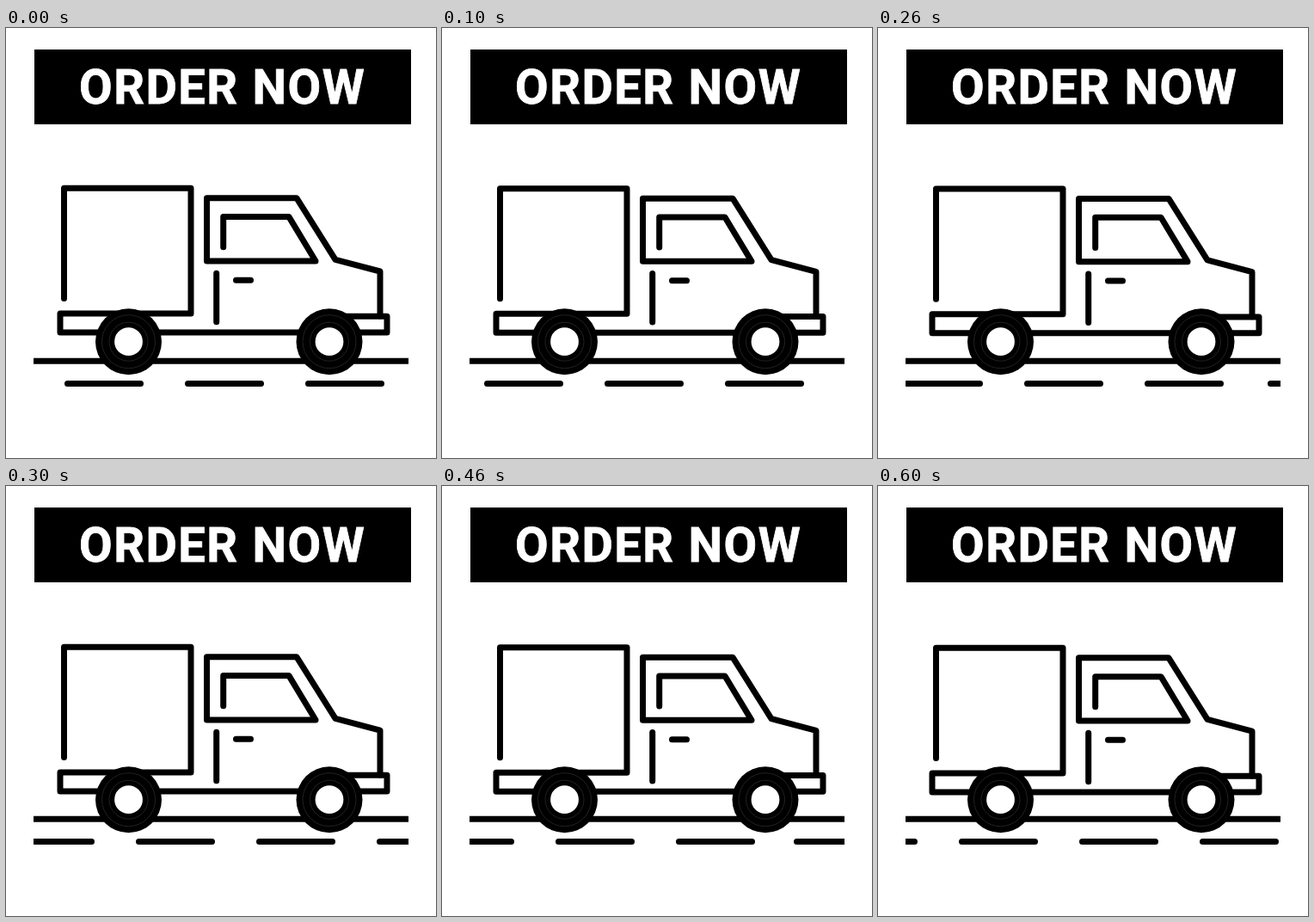
An HTML page that plays this animation: 500x500 px, repeating every 0.7 s.

```html
<!DOCTYPE html>
<html lang="en">
<head>
<meta charset="utf-8">
<title>Order now</title>
<style>
  html, body { margin: 0; width: 100%; height: 100%; overflow: hidden; background: #fff; }
  svg { display: block; width: 100vw; height: 100vh; }
  .line { fill: none; stroke: #000; stroke-width: 7; stroke-linecap: round; stroke-linejoin: round; }
  .ring { fill: none; stroke: #222; stroke-width: 1; }
  text {
    font: bold 56px Roboto, Arial, sans-serif;
    letter-spacing: 1.5px;
    word-spacing: 0.5px;
    fill: #fff;
    stroke: #fff;
    stroke-width: 0.8px;
  }
</style>
</head>
<body>
<svg viewBox="0 0 500 500">
  <defs>
    <clipPath id="lane"><rect x="32" y="400" width="436" height="30"/></clipPath>
    <g id="wheel">
      <circle r="38.5"/>
      <circle r="31" class="ring"/>
      <circle r="22.5" class="ring"/>
      <circle r="16.4" fill="#fff"/>
    </g>
  </defs>

  <rect x="33" y="25" width="438" height="87"/>
  <text x="85" y="88">ORDER NOW</text>

  <path d="M32 387.3H468" stroke="#000" stroke-width="7"/>
  <g clip-path="url(#lane)"><path id="dashes" class="line"/></g>

  <g id="body" class="line">
    <path d="M67.5 314.5V186.3H215V332H63V354H443V335.2H395"/>
    <path d="M435 335V283L383 269.3L338 197.8H233.5V271H360L329 219.6H252.7V254.7"/>
    <path d="M244.7 285.2V341.7M267.5 293.3H284.5"/>
  </g>

  <use href="#wheel" x="142.5" y="364.7"/>
  <use href="#wheel" x="376" y="364.7"/>
</svg>
<script>
  const LOOP = 700, STEP = 100, GAP = 140, DASH = 85;
  const body = document.getElementById('body');
  const dashes = document.getElementById('dashes');
  const start = performance.now();

  function draw() {
    const step = Math.floor(((performance.now() - start) % LOOP) / STEP);
    const first = 71.5 - 19 * step;
    const starts = [0, 1, 2].map(i => first + GAP * i);
    // The dash entering on the right runs faster, then falls into line.
    starts.push(step < 6 ? 500.5 - 22 * step : first + GAP * 3);
    dashes.setAttribute('d', starts.map(x => `M${x} 413.5h${DASH}`).join(''));
    body.setAttribute('transform', `translate(0 ${0.34 * step})`);
    requestAnimationFrame(draw);
  }
  draw();
</script>
</body>
</html>
```
